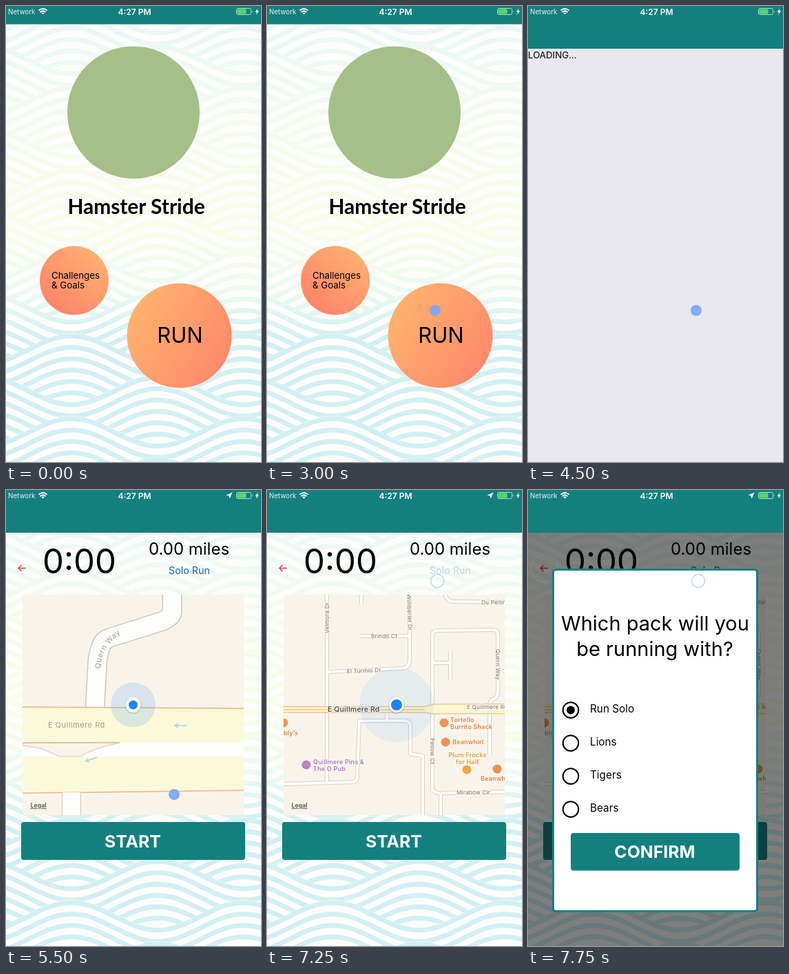
An HTML page that plays this animation: 370 by 662 pixels, repeating every 8000 ms.

```html
<!DOCTYPE html>
<html lang="en">
<head>
<meta charset="utf-8">
<title>Running app</title>
<style>
  html, body { margin: 0; width: 100%; height: 100%; overflow: hidden; }
  svg { display: block; width: 100%; height: 100%; }
  text { font-family: Inter, "Open Sans", sans-serif; }
  .teal { fill: #14807e; }
  .mid { text-anchor: middle; }
  .button { font-weight: 700; font-size: 24.8px; fill: #fff; text-anchor: middle; }
  .road { fill: none; stroke-linejoin: round; }
  .street { font-size: 8.2px; fill: #77736d; letter-spacing: .2px; stroke: #fbf8f2; stroke-width: 2px; paint-order: stroke; }
  .poi { font-size: 9px; font-weight: 600; letter-spacing: .2px; fill: #e8833a; stroke: #fbf8f2; stroke-width: 2px; paint-order: stroke; }
  .radio circle { fill: none; stroke: #000; stroke-width: 2; }
  .radio text { font-size: 15.3px; }
</style>
</head>
<body>
<svg viewBox="0 0 370 662" preserveAspectRatio="none">
  <defs>
    <linearGradient id="waveTint" gradientUnits="userSpaceOnUse" x1="0" y1="0" x2="0" y2="662">
      <stop offset="0" stop-color="#e8f6f8"/><stop offset=".27" stop-color="#f5fbf0"/>
      <stop offset=".5" stop-color="#fafdea"/><stop offset=".62" stop-color="#edf9f1"/>
      <stop offset=".73" stop-color="#d2f0f2"/><stop offset="1" stop-color="#d2f0f2"/>
    </linearGradient>
    <linearGradient id="goalFill" x1="1" y1="0" x2="0.1" y2="1">
      <stop offset=".1" stop-color="#ffb16f"/><stop offset="1" stop-color="#ff7f6a"/>
    </linearGradient>
    <linearGradient id="runFill" x1="0" y1="0.2" x2="1" y2="0.8">
      <stop offset="0" stop-color="#ffb56d"/><stop offset="1" stop-color="#ff866b"/>
    </linearGradient>
    <linearGradient id="edgeShade">
      <stop offset="0" stop-opacity="0"/><stop offset="1" stop-opacity=".2"/>
    </linearGradient>
    <clipPath id="mapClip"><rect x="24" y="152" width="321" height="320"/></clipPath>
    <g id="waves"><rect x="-10" y="-10" width="390" height="700" fill="#fdfefc"/></g>
    <path id="streets" d="M87 140V424M20 427L124 424Q130 424 131 416L134 335H200Q208 335 208 343V383L226 386V480
      M87 264L196 259Q207 258 207 246V140M134 212H207M137 140V165M174 320V335
      M240 436V211Q240 204 247 204L328 203Q335 203 335 210V290Q335 302 328 304Q323 306 323 314V384
      M240 251H266M266 235V275M256 140Q258 162 270 162L420 163M240 436Q246 441 254 440L363 438V470M252 440V480
      M359 198L361 262M361 217H420M342 263L420 259M384 260L386 287L420 290"/>
    <path id="bend" d="M241 140V178Q240 184 228 190L152 214Q140 217 136 232L133 245L129 316"/>
    <path id="bendLabel" d="M137 260C138 240 144 226 164 210"/>
  </defs>

  <rect width="370" height="662" fill="#e9e8ef"/>

  <g id="home">
    <use href="#waves"/>
    <rect class="teal" x="-10" y="-10" width="390" height="36.500"/>
    <circle cx="185" cy="154.500" r="96" fill="#a5bf88"/>
    <text class="mid" x="189" y="302" style="font:700 29.9px Lato,sans-serif">Hamster Stride</text>
    <circle cx="99" cy="398.500" r="50" fill="url(#goalFill)"/>
    <text font-size="13.300" x="66" y="396">Challenges<tspan x="66" y="410">&amp; Goals</tspan></text>
    <g id="run">
      <circle cx="251.500" cy="478.500" r="76" fill="url(#runFill)"/>
      <text class="mid" x="252.500" y="488.500" font-size="31">RUN</text>
    </g>
  </g>

  <g id="card">
    <rect x="-10" width="10" height="662" fill="url(#edgeShade)"/>
    <g id="loading">
      <rect width="370" height="662" fill="#e9e8ef"/>
      <text y="76" font-size="13.300">LOADING...</text>
    </g>
    <g id="tracker">
      <use href="#waves"/>
      <text x="53" y="121" font-size="49">0:00</text>
      <text class="mid" x="265.500" y="94" font-size="24">0.00 miles</text>
      <text id="solo" class="mid" x="266" y="122" font-size="14.300" fill="#1062bd">Solo Run</text>
      <path d="M29 113.500H18M22.500 109L18 113.500L22.500 118" fill="none" stroke="#f03a48" stroke-width="1.500"/>
      <g clip-path="url(#mapClip)">
        <rect x="24" y="152" width="321" height="320" fill="#f8f4ec"/>
        <g id="closeMap">
          <use href="#bend" class="road" stroke="#cfc5b8" stroke-width="29"/>
          <use href="#bend" class="road" stroke="#fdfdfb" stroke-width="26"/>
          <path d="M20 367H345V387H20Z" fill="#fdfdfb"/>
          <path d="M24 371L50 375L78 387H108Q125 375 165 367H24Z" fill="#f8f4ec" stroke="#cfc5b8"/>
          <path d="M20 316L350 317V367H20ZM20 388L350 386V436L20 440Z" fill="#fcf9da"/>
          <path d="M20 315L350 317M20 367L165 366.500M20 440L350 436" fill="none" stroke="#f2b483" stroke-width="1.500"/>
          <path d="M81.500 440V473M108.500 440V473" stroke="#cfc5b8"/>
          <path d="M82 439H108V473H82Z" fill="#fdfdfb"/>
          <path d="M262 342H246M250 339L245 342L250 345M132 388L116 394M119 390L116 394L121 395" fill="none" stroke="#a5d8ea" stroke-width="1.600"/>
          <g font-size="11" fill="#a19d97" letter-spacing=".5">
            <text x="61" y="345">E Quillmere Rd</text>
            <text><textPath href="#bendLabel">Quern Way</textPath></text>
          </g>
        </g>
        <g id="wideMap">
          <use href="#streets" class="road" stroke="#d8d1c7" stroke-width="6"/>
          <use href="#streets" class="road" stroke="#fefefc" stroke-width="4"/>
          <path d="M-60 314.500H228L242 311L480 310V324L242 325L228 323H-60Z" fill="#fcf8d0" stroke="#f3c48f" stroke-width="1.300"/>
          <path d="M-60 319H229" stroke="#f5c58c" stroke-width="1.500"/>
          <g class="street">
            <text x="290" y="318">E Quillmere Rd</text>
            <text x="311" y="166">Du Pellin Dr</text>
            <text x="366" y="221">Osierwy</text>
            <text x="275" y="442">Mirabow Cir</text>
            <text transform="translate(332 231) rotate(90)">Quern Way</text>
          </g>
          <g id="places">
            <g class="street">
              <text transform="translate(90 208) rotate(-90)">Velmora Dr</text>
              <text x="151" y="215">Brindo Ct</text>
              <text transform="translate(203 151) rotate(88)">Wimberlet Dr</text>
              <text x="116" y="266" transform="rotate(-2 116 266)">El Turmio Dr</text>
              <text transform="translate(237 360) rotate(90)">Pellow Ct</text>
              <text x="88" y="322" font-weight="600" style="font-size:10.400px;fill:#55514c">E Quillmere Rd</text>
            </g>
            <g fill="#ee9350">
              <circle cx="257" cy="338" r="6.500"/><circle cx="259" cy="366" r="6.500"/>
              <circle cx="334" cy="405" r="6.500"/><circle cx="24" cy="338" r="6.500"/>
              <circle cx="290" cy="406" r="6.500" fill="#eba83f"/><circle cx="57" cy="399" r="6.500" fill="#b884c6"/>
            </g>
            <g class="poi">
              <text x="266" y="337">Tortello<tspan x="266" y="347">Burrito Shack</tspan></text>
              <text x="269" y="369">Beanwhirl</text>
              <text x="310" y="422">Beanwhirl</text>
              <text x="24" y="356">bly’s</text>
              <text class="mid" x="291" y="388" style="fill:#e2a03a">Plum Frocks<tspan x="291" y="398">for Half</tspan></text>
              <text x="67" y="398" style="fill:#b07cc0">Quillmere Pins &amp;<tspan x="67" y="408">The O Pub</tspan></text>
            </g>
          </g>
        </g>
        <g id="blankTiles">
          <rect x="24" y="152" width="193" height="34" fill="#f7f3ec"/>
          <path d="M24 159.500H217M24 185.500H217M43.500 152V186m26-34v34m26-34v34m26-34v34m27-34v34m26-34v34m26-34v34" stroke="#c9c5be" fill="none"/>
          <path d="M43 469H345" stroke="#b5b1aa" stroke-width="6" stroke-dasharray="1 25.200"/>
        </g>
        <g id="user">
          <circle id="halo" fill="#4a9cf0"/>
          <circle r="12" cy="1" fill="#000" opacity=".13"/>
          <circle r="11" fill="#fff"/>
          <circle id="core" fill="#1e82fa"/>
        </g>
        <text x="35.500" y="461" font-size="8.800" font-weight="600" fill="#55534f" text-decoration="underline">Legal</text>
      </g>
      <rect class="teal" x="22" y="482" width="325" height="55" rx="4"/>
      <text class="button" x="184" y="519">START</text>
    </g>
    <rect class="teal" width="370" height="62"/>
  </g>

  <g id="modal">
    <rect y="62" width="370" height="600" opacity=".5"/>
    <circle cx="24" cy="114" r="20" fill="none" stroke="#a0a0a0" opacity=".35"/>
    <rect x="36.500" y="115.500" width="296" height="496" rx="4" fill="#fff" stroke="#14807e" stroke-width="3"/>
    <text class="mid" font-size="29" x="184.500" y="204">Which pack will you<tspan x="184" y="241">be running with?</tspan></text>
    <g id="packs"><circle cx="62" cy="319.500" r="6"/></g>
    <rect class="teal" x="62" y="498" width="245" height="54.500" rx="4"/>
    <text class="button" x="184" y="534">CONFIRM</text>
  </g>

  <g fill="#fff">
    <text x="3" y="12.300" font-size="9.800" fill="#e6f1f1">Network</text>
    <path d="M47.500 6.500Q53.500 1.500 59.500 6.500M49.500 9Q53.500 5.500 57.500 9" fill="none" stroke="#fff" stroke-width="1.700"/>
    <path d="M51.300 10.300Q53.500 8.500 55.700 10.300L53.500 12.600Z"/>
    <text class="mid" x="186.500" y="12.500" font-size="12" font-weight="600">4:27 PM</text>
    <path id="locating" d="M328.500 3.500L324.500 12.500L323.500 8.500L319.500 7.500Z"/>
    <rect x="334.500" y="3.500" width="21" height="9" rx="2" fill="none" stroke="#b9d8d7"/>
    <rect x="335.500" y="4.500" width="13" height="7" rx="1" fill="#55d966"/>
    <path d="M357 6.500Q358.500 8 357 9.500ZM365.500 3.500L361.500 8.700H364L362.700 13L367 7.300H364.500Z"/>
  </g>

  <circle id="dot" r="8" fill="#7ba6fa" opacity=".92"/>
  <circle id="ring" r="9.500" fill="none" stroke="#a9c3e6" stroke-width="1.500" opacity=".7"/>
</svg>
<script>
const LOOP = 8000, STEP = 250;
const el = id => document.getElementById(id);
const set = (id, attrs) => { for (const key in attrs) el(id).setAttribute(key, attrs[key]); };
const show = (id, on) => { el(id).style.display = on ? '' : 'none'; };
const progress = (t, from, to) => Math.min(1, Math.max(0, (t - from) / (to - from)));
const mix = (a, b, u) => a + (b - a) * u;
const easeInOut = u => u < .5 ? 4 * u ** 3 : 1 - 4 * (1 - u) ** 3;
// Parabola through a, b and c at u = 0, 1 and 2.
const arc = (a, b, c, u) => a * (u - 1) * (u - 2) / 2 - b * u * (u - 2) + c * u * (u - 1) / 2;

function waveLine(y, crest) {
  let d = '';
  for (let x = -10; x <= 380; x += 10)
    d += `${d ? 'L' : 'M'}${x} ${(y - 20 * Math.cos((x - crest) * 2 * Math.PI / 250)).toFixed(1)}`;
  return d;
}

// Overlapping rows of stripes, each row half a wavelength off the one above.
function buildWaves() {
  let out = '';
  for (let row = 0; row < 14; row++) {
    const y = row * 60 - 105, crest = row % 2 ? 220 : 95;
    out += `<path d="${waveLine(y, crest)}V700H-10Z" fill="#fdfefc"/>`;
    for (let i = 0; i < 6; i++)
      out += `<path d="${waveLine(y + 4 + i * 16.5, crest)}" fill="none" stroke="url(#waveTint)" stroke-width="7"/>`;
  }
  el('waves').innerHTML += out;
}

function buildPacks() {
  el('packs').innerHTML += ['Run Solo', 'Lions', 'Tigers', 'Bears'].map((name, i) =>
    `<g class="radio" transform="translate(0 ${i * 48})"><circle cx="62" cy="319.5" r="11.3"/>
     <text x="90" y="323">${name}</text></g>`).join('');
}

function drawPointer(t) {
  const runTap = t >= 3750 && t < 4500, soloTap = t >= 7250;
  const u = (t - 1000) / 1000, up = progress(t, 5500, 6530);
  const x = t < 3000 ? arc(14, 182, 244, u) : mix(244, 247, up);
  const y = t < 3000 ? arc(4, 341, 442, u) : mix(442, 132, up);
  show('dot', t >= 1000 && !runTap && !soloTap);
  show('ring', runTap || soloTap);
  set('dot', { cx: x, cy: y });
  set('ring', { cx: runTap ? 241 : x, cy: runTap ? 461 : y, stroke: runTap ? '#b9aca6' : '#a9c3e6' });
}

function drawPush(t) {
  const p = easeInOut(progress(t, 3845, 4345));
  set('home', {
    opacity: mix(1, .3, p),
    transform: `translate(${185 - 10 * p} 331) scale(${mix(1, .95, p)}) translate(-185 -331)`
  });
  set('run', { opacity: t >= 3750 ? .45 : 1 });
  set('card', { transform: `translate(${370 * (1 - p)} 0)` });
  show('card', p > 0);
  show('loading', t < 5000);
  show('tracker', t >= 5000);
  show('locating', t >= 5000);
}

function drawMap(t) {
  const zoom = progress(t, 5500, 6250), pulse = progress(t, 6250, 7250);
  const wide = t >= 5750;
  const userX = t <= 6250 ? mix(184.5, 133, zoom) : mix(133, 188, easeInOut(progress(t, 6250, 6750)));
  show('closeMap', t >= 5250 && !wide);
  show('wideMap', wide);
  show('places', t >= 6750);
  show('blankTiles', t === 6250 || t === 6000);
  set('wideMap', { transform: `translate(${userX} 312) scale(${mix(3, 1, zoom)}) translate(-188 -312)` });
  set('user', { transform: `translate(${userX} 312)` });
  set('halo', { r: mix(32.5, 54, pulse), opacity: wide ? mix(.38, .1, pulse) : .19 });
  set('core', { r: wide ? 8 : 6.5 });
  set('solo', { opacity: t === 7250 ? .25 : 1 });
}

function render(now) {
  const t = Math.floor(now % LOOP / STEP) * STEP;
  drawPush(t);
  drawMap(t);
  show('modal', t >= 7500);
  set('modal', { opacity: t === 7500 ? .5 : 1 });
  drawPointer(t);
}

buildWaves();
buildPacks();
const start = performance.now();
render(0);
requestAnimationFrame(function tick() {
  render(performance.now() - start);
  requestAnimationFrame(tick);
});
</script>
</body>
</html>
```
